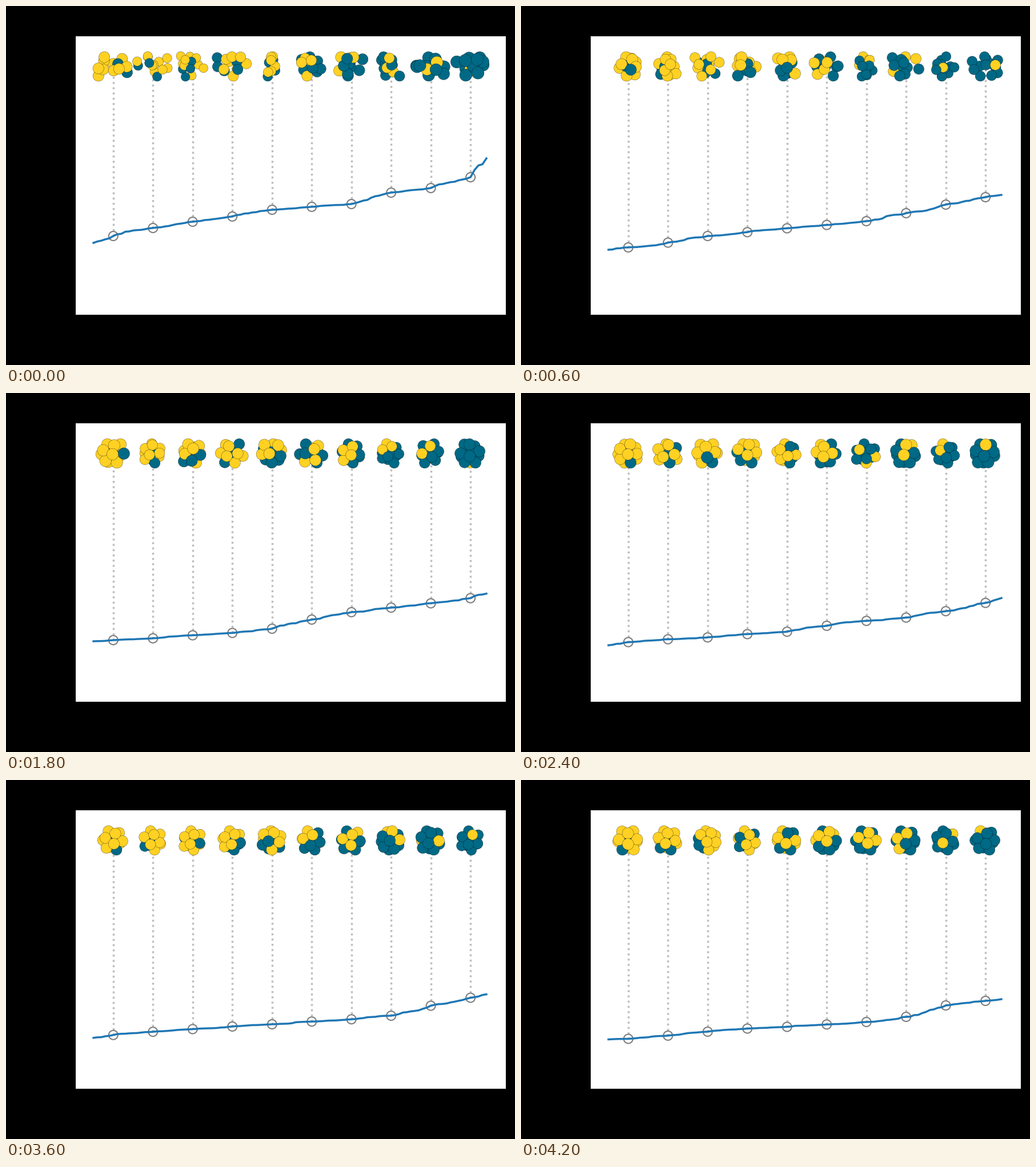
Write a matplotlib script that moves like this. It is 891x629 px and loops after 4800 ms.

```python
import numpy as np
import matplotlib.pyplot as plt
from matplotlib.animation import FuncAnimation
from matplotlib.patches import Circle, Rectangle

W, H, DPI = 891, 629, 100
PT = 72 / DPI
STEPS, SITES = 8, 10
YELLOW, TEAL = "#FFD123", "#006985"
SITE_X = 187.8 + 69.48 * np.arange(SITES)
CURVE_X = 153.1 + 6.948 * np.arange(100)
ROW_Y, HALF = 105.9, 26
BOND = 0.54  # atom radius relative to the cluster radius

# Curve heights at the key samples, by step; steps left out are blended.
KEYS = [0, 5, 25, 45, 65, 75, 85, 95, 99]
HEIGHTS = {
    0: [415, 403, 378, 357, 347, 327, 319, 300, 267],
    1: [427, 423, 403, 389.5, 377, 363, 348, 335, 331],
    2: [434, 429, 407, 391, 376, 371.5, 366, 354, 332],
    3: [435, 433, 424.5, 413, 384, 376, 368.5, 359.5, 351.5],
    5: [449, 440, 432, 423.5, 414.5, 411, 396, 376, 367],
    7: [454.5, 453.5, 441, 432.5, 424, 415, 395, 387, 384],
}


def unit(v):
    return v / np.linalg.norm(v)


def icosahedron(axis, side):
    """Unit corners with one at axis and a neighbour of it towards side."""
    a = unit(np.array(axis, float))
    u = unit(side - a * np.dot(side, a))
    w = np.cross(a, u)
    turn = 2 * np.pi * np.arange(5)[:, None] / 5
    ring = (a + 2 * (np.cos(turn) * u + np.sin(turn) * w)) / 5 ** 0.5
    cap = np.vstack([a, ring])
    return np.vstack([cap, -cap])


def rotation(vec):
    """Rotation about vec by its length."""
    angle = np.linalg.norm(vec)
    x, y, z = vec / angle
    k = np.array([[0, -z, y], [z, 0, -x], [-y, x, 0]])
    return np.eye(3) + np.sin(angle) * k + (1 - np.cos(angle)) * k @ k


BASE = icosahedron((-1, 5, 17), np.array([3, -12, 12.8]))


def cluster(rng, site, chaos):
    """Atoms (x, y, colour) from back to front, and their radius."""
    pts = BASE @ rotation(rng.normal(0, 0.12 + chaos, 3)).T
    pts = np.vstack([pts, np.zeros(3)]) + rng.normal(0, chaos, (13, 3))
    pts[:, 0] *= np.exp(rng.normal(0, chaos))

    # Teal prefers the lower and rear places and grows with the site.
    teal = 2 + int(round(10 * site / (SITES - 1)))
    rank = 0.5 * pts[:, 1] - 0.4 * pts[:, 2] + rng.normal(0, 0.6, 13)
    rank[12] = 9
    colors = np.full(13, YELLOW)
    colors[np.argsort(-rank)[:teal]] = TEAL

    low, high = pts.min(0), pts.max(0)
    scale = HALF / ((high[1] - low[1]) / 2 + BOND)
    xy = (pts - (low + high) / 2)[:, :2] * scale
    order = np.argsort(pts[:, 2])
    return [(xy[i, 0] - 1, xy[i, 1], colors[i]) for i in order], BOND * scale


def curve(rng, heights):
    """Uneven climb that passes through the key heights."""
    climb = np.cumsum(rng.gamma(3, size=100))
    return np.interp(climb, climb[KEYS], heights)


def make_step(i):
    rng = np.random.default_rng(40 + i)
    known = sorted(HEIGHTS)
    heights = [np.interp(i, known, column)
               for column in zip(*(HEIGHTS[k] for k in known))]
    chaos = 0.36 * 0.6 ** i
    balls = [cluster(rng, site, chaos) for site in range(SITES)]
    return curve(rng, heights), balls


steps = [make_step(i) for i in range(STEPS)]

fig = plt.figure(figsize=(W / DPI, H / DPI), dpi=DPI, facecolor="black")
ax = fig.add_axes([0, 0, 1, 1])
ax.set(xlim=(0, W), ylim=(H, 0))
ax.axis("off")
ax.add_patch(Rectangle((120.5, 51.5), 754, 489, fc="white", ec="black",
                       lw=0.8, zorder=0))
shown = []


def draw(i):
    while shown:
        shown.pop().remove()
    line, balls = steps[i]
    for x, y, (atoms, r) in zip(SITE_X, line[5::10], balls):
        shown.extend(ax.plot([x, x], [y, ROW_Y], ":", color="#BFBFBF",
                             lw=2.5, zorder=1))
        shown.append(ax.add_patch(Circle((x, y), 8, fill=False, ec="#7F7F7F",
                                         lw=2.1 * PT, zorder=2)))
        for dx, dy, color in atoms:
            shown.append(ax.add_patch(Circle((x + dx, ROW_Y + dy), r, fc=color,
                                             ec="black", lw=0.3 * PT, zorder=4)))
    shown.extend(ax.plot(CURVE_X, line, color="#1F77B4", lw=2.5, zorder=3))
    return shown


anim = FuncAnimation(fig, draw, frames=STEPS, init_func=lambda: draw(0),
                     interval=600, repeat=True, repeat_delay=0, blit=False)
plt.show()
```
